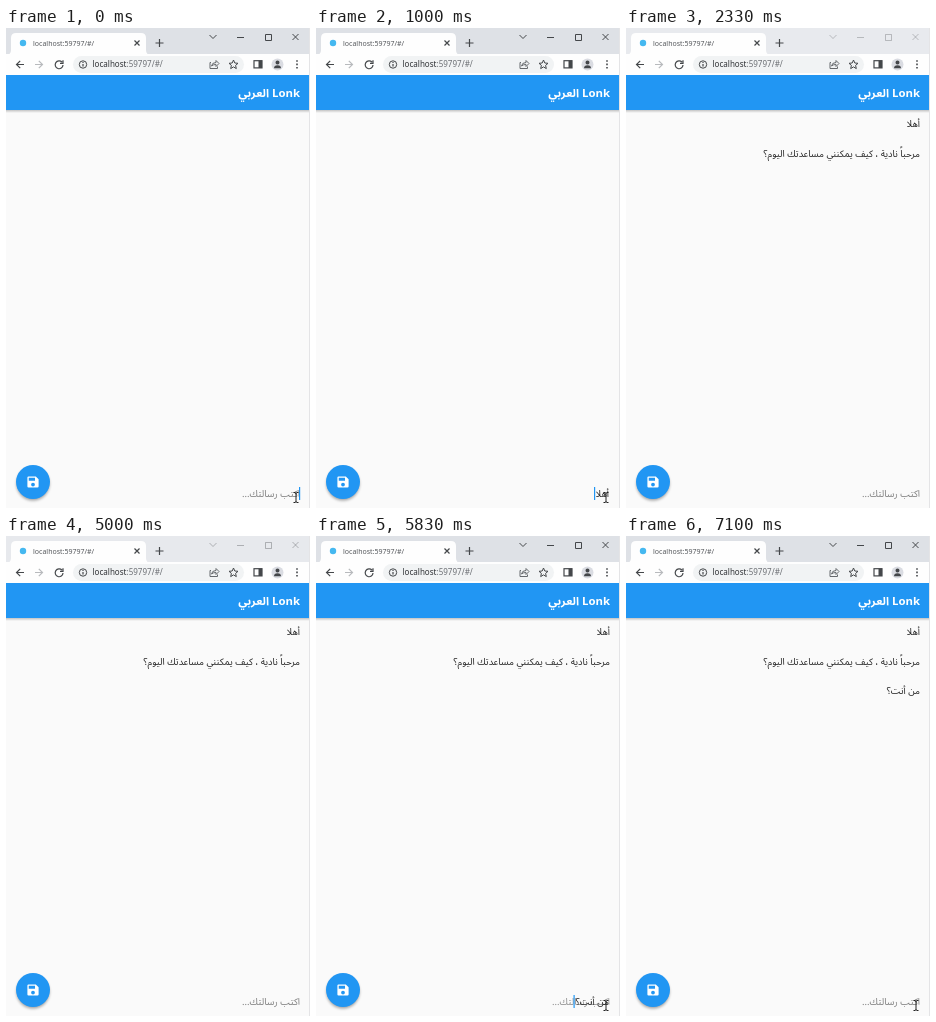
These frames come from a looping animation (304 by 480 pixels, 8000 ms). An HTML page:

```html
<!DOCTYPE html>
<html lang="ar">
<head>
<meta charset="utf-8">
<style>
html, body { margin: 0; width: 100%; height: 100%; overflow: hidden; background: #fafafa; }
svg { display: block; width: 304px; height: 480px; }
.ar { font: 9.4px "Noto Sans Arabic", "Noto Sans", "DejaVu Sans", sans-serif; direction: rtl; fill: #222; }
.ui { font-family: "Noto Sans", "Open Sans", sans-serif; }
.line { fill: none; stroke: #44474a; stroke-width: 1.2; }
.thin { stroke-width: 1; }
</style>
</head>
<body>
<svg viewBox="0 0 304 480" xmlns="http://www.w3.org/2000/svg">
  <defs>
    <filter id="soft" x="-50%" y="-50%" width="200%" height="200%"><feGaussianBlur stdDeviation="1.8"/></filter>
    <linearGradient id="shade" x2="0" y2="1">
      <stop stop-color="#000" stop-opacity=".22"/><stop offset="1" stop-color="#000" stop-opacity="0"/>
    </linearGradient>
  </defs>
  <rect width="304" height="480" fill="#fafafa"/>

  <!-- tab strip -->
  <rect id="strip" width="304" height="27"/>
  <path d="M0 27Q5 27 5 22V10Q5 5 10 5H135Q140 5 140 10V22Q140 27 145 27Z" fill="#fefefe"/>
  <circle cx="17" cy="15" r="3.2" fill="#45b8f0"/>
  <text class="ui" x="27" y="17.6" font-size="7" fill="#55585c">localhost:59797/#/</text>
  <path class="line" d="M128.5 12.5l5 5m0-5l-5 5"/>
  <path class="line" d="M149.5 15h8m-4-4v8"/>
  <g id="controls" class="line thin">
    <path d="M203.5 7l3.500 3.500 3.500-3.500M231 9.500h7M259.500 6.500h6v6h-6zM286.500 6l6 6m0-6l-6 6"/>
  </g>

  <!-- toolbar -->
  <rect y="26" width="304" height="22" fill="#fefefe"/>
  <rect x="67" y="28" width="171" height="17" rx="8.500" fill="#f1f3f4"/>
  <path class="line" d="M18 36.500h-7.500m3.700-3.700l-3.700 3.700 3.700 3.700"/>
  <path class="line" style="stroke:#b8babd" d="M29 36.500h7.500m-3.700-3.700l3.700 3.700-3.700 3.700"/>
  <path class="line" d="M56 34.200A3.900 3.900 0 1 0 57 37M57 32.300v3h-3"/>
  <circle class="line thin" cx="77" cy="36.500" r="3.700"/>
  <path class="line" d="M77 36v2.600M77 34v1.100"/>
  <text class="ui" x="86.500" y="39.300" font-size="8.050" fill="#303236">localhost<tspan fill="#6c6f74">:59797/#/</tspan></text>
  <path class="line thin" style="stroke:#65686c" d="M205 34.500h-1v6h7.500v-2M205.500 38q.5-3.500 4.500-3.500v-2l3 3-3 3v-2q-3 0-4.500 1.500z"/>
  <path class="line thin" d="M227.500 32l1.300 3 3.200.3-2.400 2.100.7 3.200-2.800-1.700-2.800 1.700.7-3.200-2.400-2.100 3.200-.3z"/>
  <rect class="line" x="248" y="32.700" width="8" height="7.200"/>
  <path d="M252.500 32.500h3.500v7.500h-3.500z" fill="#44474a"/>
  <circle cx="271.500" cy="36.500" r="6" fill="#dadce2"/>
  <path d="M268 40.200q0-3 3.500-3t3.500 3zM273.500 34.500a2 2 0 1 1-4 0 2 2 0 0 1 4 0z" fill="#44474a"/>
  <path d="M290.200 32.200h1.600v1.600h-1.600zm0 3.400h1.600v1.600h-1.600zm0 3.400h1.600v1.600h-1.600z" fill="#44474a"/>

  <!-- app bar -->
  <rect y="82" width="304" height="3" fill="url(#shade)"/>
  <rect y="47" width="304" height="35" fill="#2196f3"/>
  <text class="ar" x="294" y="69" style="font-size:11.400px;font-weight:600;fill:#fff">Lonk العربي</text>

  <!-- conversation -->
  <text id="msg1" class="ar" x="294" y="99">أهلا</text>
  <text id="msg2" class="ar" x="294" y="128.500">مرحباً نادية ، كيف يمكنني مساعدتك اليوم؟</text>
  <text id="msg3" class="ar" x="294" y="158">من أنت؟</text>

  <!-- save button -->
  <circle cx="27" cy="456" r="16.500" fill="#000" opacity=".36" filter="url(#soft)"/>
  <circle cx="27" cy="454" r="17" fill="#2196f3"/>
  <path transform="translate(27 454) scale(1.12) translate(-27 -454)" fill-rule="evenodd" fill="#fff" d="M23 449h6.500l2.500 2.500v6.500q0 1-1 1h-8q-1 0-1-1v-8q0-1 1-1zM23.200 450.200v2.600h5.600v-2.600zM28.700 456.300a1.700 1.700 0 1 0-3.400 0 1.700 1.700 0 0 0 3.400 0z"/>

  <!-- input -->
  <text id="hint" class="ar" x="294" y="469" style="fill:#7c7c7c">اكتب رسالتك...</text>
  <text id="entry" class="ar" x="293" y="469"></text>
  <rect id="caret" y="459" width="1.200" height="13" fill="#2196f3"/>
  <path id="beam" class="line thin" style="stroke:#222" d="M287.500 464.500h1.500l1 .8 1-.8h1.500M290 465v9M287.500 474.500h1.500l1-.8 1 .8h1.500"/>
  <path d="M303.500 0V480" stroke="#e4e4e6"/>
</svg>
<script>
const LOOP = 8000, FADE = 165;
const $ = id => document.getElementById(id);
const ramp = (t, a, b) => Math.min(1, Math.max(0, (t - a) / (b - a)));
const within = (t, a, b) => t >= a && t < b;
const mix = (a, b, k) => `rgb(${a.map((v, i) => Math.round(v + (b[i] - v) * k))})`;
const fade = (id, v) => $(id).setAttribute("opacity", v);

// each message is entered at once, then sent; the caret is hidden between off and on
const entries = [
  { text: "أهلا", typed: 830, off: 1230, on: 1630, sent: 1870, x: 278 },
  { text: "من أنت؟", typed: 5830, off: 6370, on: 6730, sent: 6900, x: 257.5 }
];

function draw(t) {
  const blur = ramp(t, 2250, 2310) * (1 - ramp(t, 4995, 5070));
  $("strip").setAttribute("fill", mix([222, 225, 230], [232, 234, 238], blur));
  fade("controls", 1 - 0.7 * blur);

  let hint = 1, text = "", x = 293;
  let caret = +(t < 650 || within(t, 5030, 5590));
  for (const e of entries) {
    if (within(t, e.typed, e.sent)) {
      hint = 1 - ramp(t, e.typed - 20, e.typed + FADE);
      text = e.text;
      x = e.x;
      caret = +!within(t, e.off, e.on);
    } else if (within(t, e.sent, e.sent + FADE)) {
      hint = ramp(t, e.sent - 20, e.sent + FADE - 20);
    }
  }
  fade("hint", hint);
  if ($("entry").textContent !== text) $("entry").textContent = text;
  $("caret").setAttribute("x", x);
  fade("caret", caret);

  fade("msg1", +(t >= 1870));
  fade("msg2", +(t >= 2270));
  fade("msg3", +(t >= 6900));
  fade("beam", +!within(t, 2270, 5030));
}

function tick() {
  draw(performance.now() % LOOP);
  requestAnimationFrame(tick);
}
tick();
</script>
</body>
</html>
```
